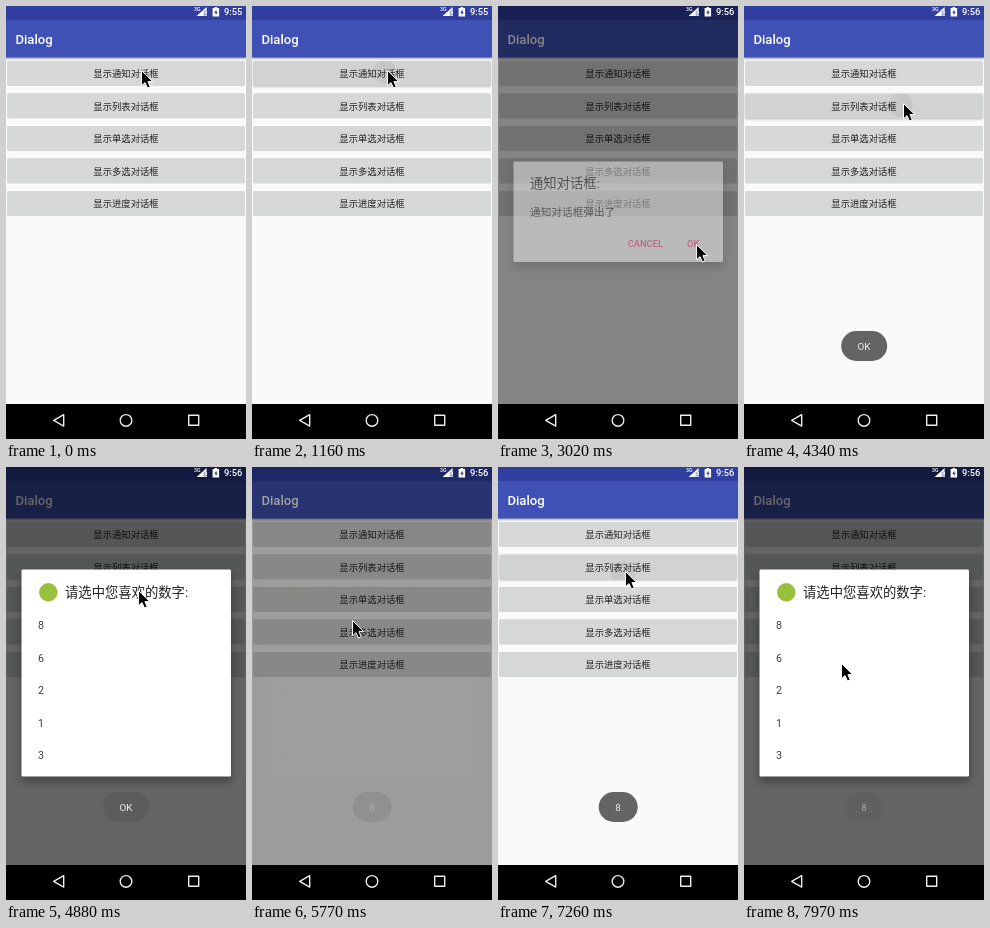
Write an HTML page that moves like this. It is 240 px wide and 433 px high and loops after 8 s.

```html
<!DOCTYPE html>
<html lang="zh-CN">
<head>
<meta charset="utf-8">
<title>Dialog</title>
<style>
  html, body { margin: 0; width: 100%; height: 100%; overflow: hidden; background: #000; }
  svg { display: block; width: 240px; height: 433px; }
  text { font: 9.33px Roboto, "Noto Sans CJK SC", sans-serif; fill: #212121; }
  .medium { font-weight: 500; }
  .title { font-size: 13.33px; }
  .body { font-size: 10.67px; fill: #3c3c3c; }
  .mid { text-anchor: middle; }
  .pink { fill: #ff4081; font-weight: 500; }
  .white { fill: #fff; }
  .bar { filter: drop-shadow(0 1px 1px #0006); }
  .button { fill: #d6d7d7; filter: drop-shadow(0 .7px .7px #0003); }
  .button.down { fill: #d1d2d2; filter: drop-shadow(0 1.4px 1.2px #0004); }
  .card { fill: #fff; filter: drop-shadow(0 5px 4px #0005); }
  .pill { fill: #5c5c5c; fill-opacity: .95; }
</style>
</head>
<body>
<svg viewBox="0 0 240 433">
  <rect width="240" height="398" fill="#fafafa"/>
  <rect class="bar" y="13" width="240" height="38.5" fill="#3f51b5"/>
  <rect width="240" height="14" fill="#303f9f"/>
  <text class="title medium white" x="9.4" y="38" style="font-size:13.1px">Dialog</text>
  <g id="buttons"></g>
  <clipPath id="clip"><rect id="clipRect" x="1" width="238" height="25"/></clipPath>
  <g clip-path="url(#clip)"><circle id="ripple" r="12" fill="#000" fill-opacity=".05"/></g>
  <rect id="dim" width="240" height="398"/>

  <g id="notice">
    <rect class="card" x="15.5" y="155.5" width="209.5" height="100.5" rx="1.3"/>
    <text class="title" x="32" y="182">通知对话框:</text>
    <text class="body" x="32" y="209.6">通知对话框弹出了</text>
    <text class="pink" x="129.7" y="241.2">CANCEL</text>
    <text class="pink" x="189" y="241.2">OK</text>
  </g>
  <g id="list">
    <rect class="card" x="15.5" y="102.5" width="209.5" height="207" rx="1.3"/>
    <circle cx="42.3" cy="125.3" r="9.2" fill="#97c03d"/>
    <text class="title" x="59" y="130.3">请选中您喜欢的数字:</text>
  </g>
  <g id="toast">
    <rect id="pill" class="pill" y="325" height="30" rx="15"/>
    <text id="toastText" class="mid" x="120" y="343.8" style="fill:#eee;font-size:9.9px"></text>
  </g>

  <g fill="#fff" transform="translate(-.4 -.4)">
    <path d="M201 1.5V10.5H191Z"/>
    <path d="M198 5h4v6h-4z" fill="#303f9f" fill-opacity=".4"/>
    <path d="M200 5.5h1.2v3H200zM200 9.3h1.2v1.2H200z"/>
    <text class="white medium" x="188.5" y="5" style="font-size:5.2px">3G</text>
    <path d="M207 2.5h2V1.5h2.5v1h2V11H207z"/>
    <path d="M210.8 3.8L208.7 7.3h1.4v2.5l2-3.6h-1.3z" fill="#303f9f"/>
  </g>
  <text id="clock" class="white medium" x="217.9" y="9"></text>

  <rect y="398" width="240" height="35"/>
  <g fill="none" stroke="#eee" stroke-width="1.4" stroke-linejoin="round">
    <path d="M47.7 414.4L57.7 408.7V420.1Z"/>
    <circle cx="120" cy="414.4" r="5.8"/>
    <rect x="182.7" y="409.3" width="10" height="10"/>
  </g>
  <path id="cursor" d="M.5 .5V15.8L4 12.6 6.5 18 9.2 16.8 6.9 11.6H11.8Z" stroke="#fff"/>
</svg>
<script>
const LOOP = 8000, STEP = 88.6; // the screen refreshes once per STEP ms
const $ = id => document.getElementById(id);
const set = (id, attrs) => Object.entries(attrs).forEach(([k, v]) => $(id).setAttribute(k, v));
const ramp = (t, start, length) => Math.min(1, Math.max(0, (t - start) / length));
const buttonY = i => 55 + i * 32.5;

const dialogs = [
  { id: 'notice', button: 0, press: 1060, open: 1420, close: 2968 },
  { id: 'list', button: 1, press: 4160, open: 4345, close: 5680 },
  { id: 'list', button: 1, press: 6985, open: 7268, close: LOOP }
];
const toasts = [{ text: 'OK', width: 46, at: 3060 }, { text: '8', width: 39, at: 5720 }];
const moves = [
  { from: 1770, to: 2745, x: 198, y: 238 },
  { from: 3190, to: 3985, x: 159, y: 97 },
  { from: 4605, to: 5400, x: 100, y: 153 },
  { from: 5935, to: 6730, x: 127, y: 104 },
  { from: 7440, to: 7970, x: 97, y: 196 }
];

$('buttons').innerHTML = ['通知', '列表', '单选', '多选', '进度'].map((name, i) =>
  `<rect class="button" x="1.3" y="${buttonY(i)}" width="237.4" height="24.8" rx="1.3"/>
   <text class="mid" x="120" y="${buttonY(i) + 16}">显示${name}对话框</text>`).join('');
$('list').insertAdjacentHTML('beforeend', [8, 6, 2, 1, 3].map((n, i) =>
  `<text class="body" x="32" y="${162 + i * 32.5}">${n}</text>`).join(''));
const buttons = document.querySelectorAll('.button');

function cursorAt(t) {
  let x = 135, y = 64;
  for (const m of moves) {
    const p = 1 - (1 - ramp(t, m.from, m.to - m.from)) ** 1.5;
    x += (m.x - x) * p;
    y += (m.y - y) * p;
  }
  return [Math.round(x), Math.round(y)];
}

function render(time) {
  const t = Math.floor((time % LOOP + 10) / STEP) * STEP;
  const [x, y] = cursorAt(t);
  set('cursor', { transform: `translate(${x} ${y})` });
  $('clock').textContent = t < 2300 ? '9:55' : '9:56';

  // The window fades quickly; the dimmed backdrop lingers a little.
  const shown = { notice: 0, list: 0 };
  let dim = 0;
  for (const d of dialogs) {
    const opened = ramp(t, d.open, 170);
    shown[d.id] += opened * (1 - ramp(t, d.close, 80));
    dim += .6 * opened * (1 - ramp(t, d.close, 210));
  }
  set('dim', { opacity: dim });
  for (const id in shown) set(id, { opacity: shown[id] });

  const toast = toasts.findLast(m => t >= m.at) || toasts[0];
  set('toast', { opacity: ramp(t, toast.at, 200) * (1 - ramp(t, toast.at + 2170, 170)) });
  set('pill', { x: 120.2 - toast.width / 2, width: toast.width });
  $('toastText').textContent = toast.text;

  const pressed = dialogs.find(d => t >= d.press && t < d.open);
  buttons.forEach((b, i) => b.classList.toggle('down', pressed?.button === i));
  set('ripple', { opacity: pressed ? ramp(t, pressed.press, STEP) : 0, cx: x - 2, cy: y + 2 });
  if (pressed) set('clipRect', { y: buttonY(pressed.button) });
}

function loop() {
  render(performance.now());
  requestAnimationFrame(loop);
}
loop();
</script>
</body>
</html>
```
